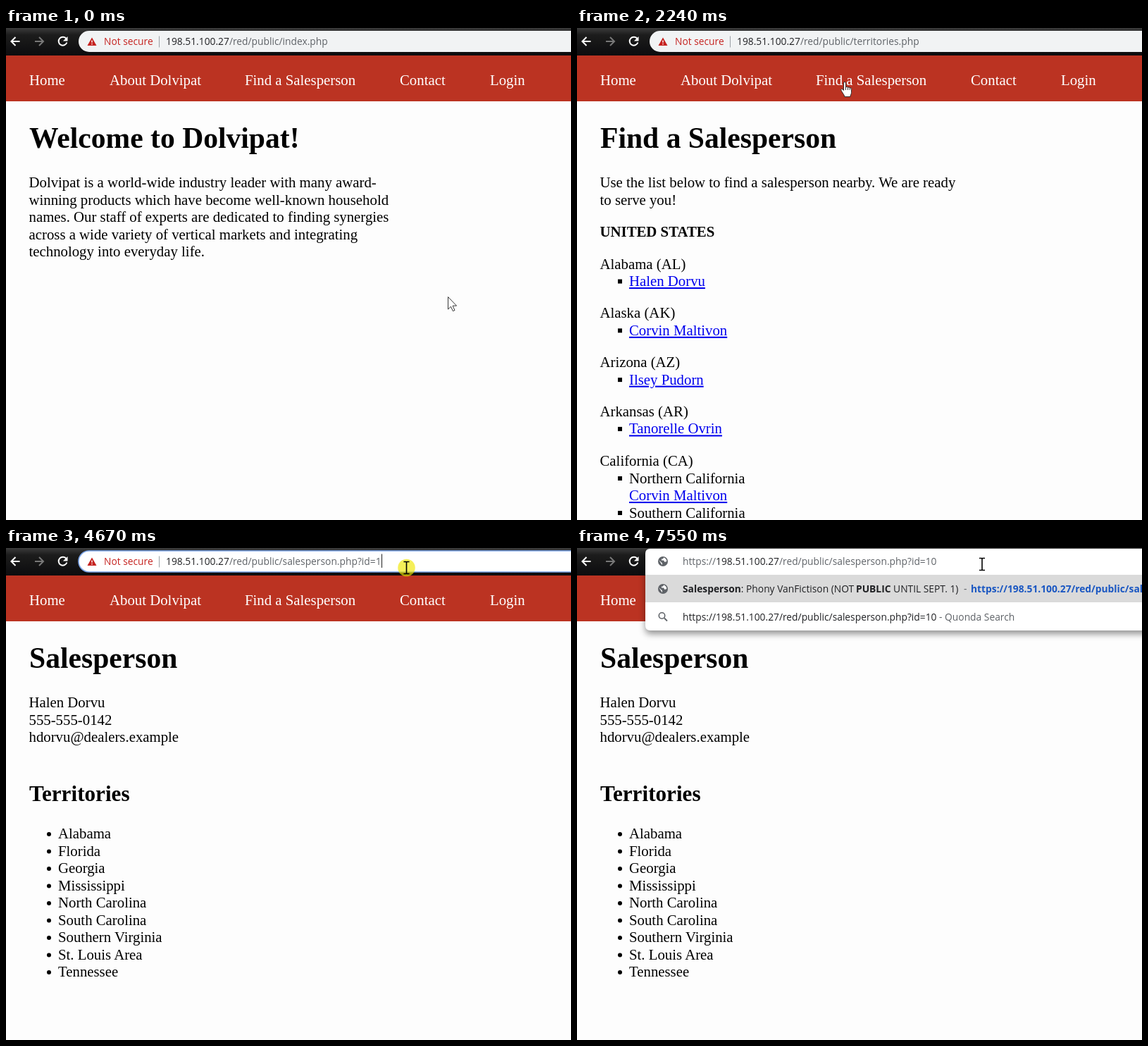
Animation of 802x698 px, one loop 8000 ms. Source, as an HTML page:

```html
<!DOCTYPE html>
<html lang="en">
<head>
<meta charset="utf-8">
<title>Salesperson lookup</title>
<style>
  html, body { margin: 0; width: 100%; height: 100%; overflow: hidden; background: #fdfdfd; }
  svg { display: block; width: 802px; height: 698px; }
  text { white-space: pre; }
  .page text { font: 20.8px "Liberation Serif", "Times New Roman", serif; fill: #000; }
  .page .nav { fill: #fff; }
  .page .h1 { font-size: 41.6px; font-weight: bold; }
  .page .h2 { font-size: 31.2px; font-weight: bold; }
  .page .b { font-weight: bold; }
  .page .link { fill: #00e; text-decoration: underline; }
  .ui text { font: 13.8px "Open Sans", "Noto Sans", sans-serif; fill: #5f6368; }
  .ui .host { fill: #202124; }
  .ui .red { fill: #c5221f; }
  .ui .blue { fill: #1a57c2; }
  .ui .b { font-weight: bold; }
  .strike { text-decoration: line-through; }
  #picked text, #picked .host { fill: #fff; }
  #drop .sheet { filter: drop-shadow(0 5px 5px rgba(0, 0, 0, .42)); }
</style>
</head>
<body>
<svg id="stage" viewBox="0 0 802 698"></svg>
<script>
const LOOP = 8000;
const BRAND = 'Dolvipat', IP = '198.51.100.27', DIR = '/red/public/';
const LINE = 24.5;

const text = (x, y, s, cls = '') => `<text x="${x}" y="${y}" class="${cls}">${s}</text>`;
const lines = (x, y, list) => list.map((s, i) => text(x, y + i * LINE, s)).join('');
const group = (id, body, cls = '') => `<g id="${id}" class="${cls}">${body}</g>`;
const span = (s, cls) => `<tspan class="${cls}">${s}</tspan>`;
const address = (x, file, scheme = '') =>
  text(x, 24, scheme + span(IP, 'host') + DIR + file);
const square = y => `<rect x="58" y="${y - 9.5}" width="6" height="6"/>`;

// Pages
const home = text(33, 170, `Welcome to ${BRAND}!`, 'h1') + lines(32.5, 226, [
  `${BRAND} is a world-wide industry leader with many award-`,
  'winning products which have become well-known household',
  'names. Our staff of experts are dedicated to finding synergies',
  'across a wide variety of vertical markets and integrating',
  'technology into everyday life.']);

const reps = [
  ['Alabama (AL)', 'Halen Dorvu'], ['Alaska (AK)', 'Corvin Maltivon'],
  ['Arizona (AZ)', 'Ilsey Pudorn'], ['Arkansas (AR)', 'Tanorelle Ovrin']];
const list = text(33, 170, 'Find a Salesperson', 'h1') +
  lines(32.5, 226, ['Use the list below to find a salesperson nearby. We are ready', 'to serve you!']) +
  text(32.5, 296, 'UNITED STATES', 'b') +
  reps.map(([state, name], i) => {
    const y = 341.5 + i * 69.8;
    return text(32.5, y, state) + square(y + LINE) + text(74, y + LINE, name, 'link');
  }).join('') +
  text(32.5, 621, 'California (CA)') +
  square(645.5) + text(74, 645.5, 'Northern California') +
  text(74, 670, reps[1][1], 'link') +
  square(694.5) + text(74, 694.5, 'Southern California');

const areas = ['Alabama', 'Florida', 'Georgia', 'Mississippi', 'North Carolina',
  'South Carolina', 'Southern Virginia', 'St. Louis Area', 'Tennessee'];
const person = text(33, 170, 'Salesperson', 'h1') +
  lines(32.5, 226, [reps[0][1], '555-555-0142', 'hdorvu@dealers.example']) +
  text(33, 359, 'Territories', 'h2') + lines(74, 412, areas) +
  areas.map((_, i) => `<circle cx="61" cy="${406 + i * LINE}" r="3"/>`).join('');

const nav = '<rect y="39" width="802" height="65" fill="#bb3322"/>' +
  [[33, 'Home'], [147, `About ${BRAND}`], [339, 'Find a Salesperson'], [559, 'Contact'], [687, 'Login']]
    .map(([x, s]) => text(x, 80.5, s, 'nav')).join('');

// Browser bar
const arrow = (x, dir, color) =>
  `<path d="M${x - 6 * dir} 19h${12 * dir}M${x} 13l${-6 * dir} 6 ${6 * dir} 6" fill="none" stroke="${color}" stroke-width="2"/>`;
const globe = y => `<g transform="translate(122 ${y})"><circle r="7" fill="#5f6368"/>
  <path d="M-5.3-1.5L-1 2.5V5.3Q-5-.2-5.3-1.5ZM1-5.4Q5-4 5.3 0L2.5 1 1-1.5H-2V-3.5H0Z" fill="#fff"/></g>`;
const pill = style => `<rect x="103" y="4" width="740" height="30" rx="15" ${style}/>`;
const file = 'salesperson.php?id=';
const full = `https://${IP}${DIR}${file}10`;

const bar = `<rect width="802" height="39" fill="url(#dark)"/>` +
  arrow(13.5, 1, '#fff') + arrow(47, -1, '#777') +
  group('reload', `<path d="M85.6 15.2A6 6 0 1 0 86.4 20.5" fill="none" stroke="#fff" stroke-width="2"/>
    <path d="M87.5 12v6.6h-6.6z" fill="#fff"/>`) +
  group('stop', '<path d="M75 13.5l11 11m0-11l-11 11" stroke="#fff" stroke-width="2"/>') +
  pill('fill="#f1f3f4"') +
  group('focus', pill('fill="#fff" stroke="#7ba4e8" stroke-width="1.6"')) +
  group('warn', `<path d="M122 13.5L128.5 25h-13z" fill="#c5221f"/>
    <path d="M122 17.5v3.3m0 1.3v1.5" stroke="#fff" stroke-width="1.4"/>
    <path d="M217.5 11.5v16" stroke="#9aa0a6"/>` + text(139, 24, 'Not secure', 'red')) +
  group('url0', address(227, 'index.php')) +
  group('url1', address(227, 'territories.php')) +
  group('url2', address(227, file + 1)) +
  group('picked', '<rect x="227" y="8.5" width="306" height="22" fill="#0078d7"/>' + address(227, file + 1)) +
  group('url3', address(227, file + 1, span('https', 'red strike') + '://'));

const drop = `<g class="sheet"><path d="M97 117V8q0-7 7-7H820V110q0 7-7 7H104q-7 0-7-7z" fill="#fff"/></g>
  <rect x="97" y="38" width="705" height="39" fill="#dadada"/>` + globe(58) +
  text(150, 63, span('Salesperson', 'host b') + span(': Phony VanFictison (NOT', 'host')) +
  text(396, 63, span('PUBLIC', 'host b') + span(' UNTIL SEPT. 1)', 'host')) +
  text(549, 63, '-') + text(559, 63, full, 'blue b') +
  `<path d="M124 99.5l4 4" stroke="#5f6368" stroke-width="1.8"/>
  <circle cx="120.5" cy="96" r="4.2" fill="none" stroke="#5f6368" stroke-width="1.6"/>` +
  text(150, 102.5, span(full, 'host') + ' - Quonda Search');

// Pointers, drawn around their hot spot
const pointers =
  group('halo', '<circle r="12.3" fill="#f0e600" opacity=".65"/>') +
  group('arrow', '<path d="M.5.5V18L4.5 14.2 7.4 20.6 10 19.5 7.1 13.1H12.6Z" fill="#fff" stroke="#222" stroke-width=".9"/>') +
  group('hand', `<g transform="translate(-7 0)" stroke="#222" stroke-width=".9">
    <path d="M5.5 12.5V2a1.5 1.5 0 0 1 3 0v6q1.5-1.5 3 .3 1.5-1 2.8.5 2.2-.6 2.2 1.7v5q0 2-1.5 4.5v1.5h-8.5v-1.5q-1-1.8-4-6.5-1.5-2.5.3-3 1.2-.3 2.7 2z" fill="#fff"/>
    <path d="M8.5 8v4m3-3.7v3.7m2.8-3.2v3.2"/></g>`) +
  group('beam', '<path d="M-4-8.5h3.2L0-7.8.8-8.5H4M-4 8.5h3.2L0 7.8.8 8.5H4M0-8V8" fill="none" stroke="#000" stroke-width="1.6"/>');

const stage = document.getElementById('stage');
stage.innerHTML = `<defs><linearGradient id="dark" x2="0" y2="1">
  <stop offset="0" stop-color="#3c3c3c"/><stop offset=".25" stop-color="#1c1c1c"/><stop offset="1" stop-color="#0c0c0e"/>
  </linearGradient></defs><rect width="802" height="698" fill="#fdfdfd"/>` +
  group('pages', nav + group('home', home) + group('list', list) + group('person', person), 'page') +
  group('chrome', bar + group('drop', drop) +
    group('typed', globe(19) + text(150, 24, 'https://' + span(IP, 'host') + DIR + file + '10')) +
    '<path id="caret" d="M0 8.5V28" stroke="#222"/>', 'ui') +
  group('pointer', pointers);

const el = {};
stage.querySelectorAll('[id]').forEach(n => el[n.id] = n);

// Visible spans in ms: [from, to, from, to, ...]
const spans = {
  home: [0, 2165], list: [2165, 3720], person: [3720, LOOP],
  url0: [0, 2090], url1: [2090, 3640], url2: [3640, 4820],
  picked: [4820, 5840], url3: [5840, 6910], typed: [6910, LOOP],
  stop: [1940, 2240, 3490, 3790],
  reload: [0, 1940, 2240, 3490, 3790, LOOP],
  warn: [0, 6910], focus: [4670, LOOP],
  halo: [1770, 1940, 3340, 3490, 4670, 4820],
  caret: [4670, 4820, 5840, 6390, 6910, 7550]
};
const isOn = (list, t) => list.some((a, i) => i % 2 === 0 && t >= a && t < list[i + 1]);
const show = (node, on) => { node.style.display = on ? '' : 'none'; };

// Pointer track: time, x, y
const track = [
  [0, 627, 381], [440, 627, 381], [470, 611, 395], [520, 621, 408], [660, 621, 408],
  [1180, 307, 130], [1450, 380, 76], [2750, 380, 76], [3190, 134.5, 365],
  [3560, 134.5, 365], [4280, 566, 32], [4320, 566, 32], [4600, 568.5, 28],
  [4930, 568.5, 28], [5070, 575, 23], [LOOP, 575, 23]];

function pointerAt(t) {
  const i = track.findIndex(k => k[0] > t);
  const [t0, x0, y0] = track[i - 1], [t1, x1, y1] = track[i];
  const p = (t - t0) / (t1 - t0), e = p * p * (3 - 2 * p);
  return [x0 + (x1 - x0) * e, y0 + (y1 - y0) * e];
}

const inside = (x, y, l, t, r, b) => x >= l && x <= r && y >= t && y <= b;

function render(t) {
  for (const id in spans) show(el[id], isOn(spans[id], t));

  const [x, y] = pointerAt(t);
  const onLink = inside(x, y, 339, 62, 497, 86) ||
    (isOn(spans.list, t) && inside(x, y, 74, 348, 182, 372));
  const kind = y < 32 ? 'beam' : onLink ? 'hand' : 'arrow';
  for (const id of ['arrow', 'hand', 'beam']) show(el[id], id === kind);
  el.pointer.setAttribute('transform', `translate(${x} ${y})`);

  const caretX = t < 5840 ? 533.5 : t < 6910 ? 581.5 : 511.5;
  el.caret.setAttribute('transform', `translate(${caretX} 0)`);
  el.drop.style.opacity = t < 6910 ? 0 : t < 7000 ? .1 : t < 7080 ? .54 : 1;
}

const start = performance.now();
function tick() {
  render((performance.now() - start) % LOOP);
  requestAnimationFrame(tick);
}
tick();
</script>
</body>
</html>
```
